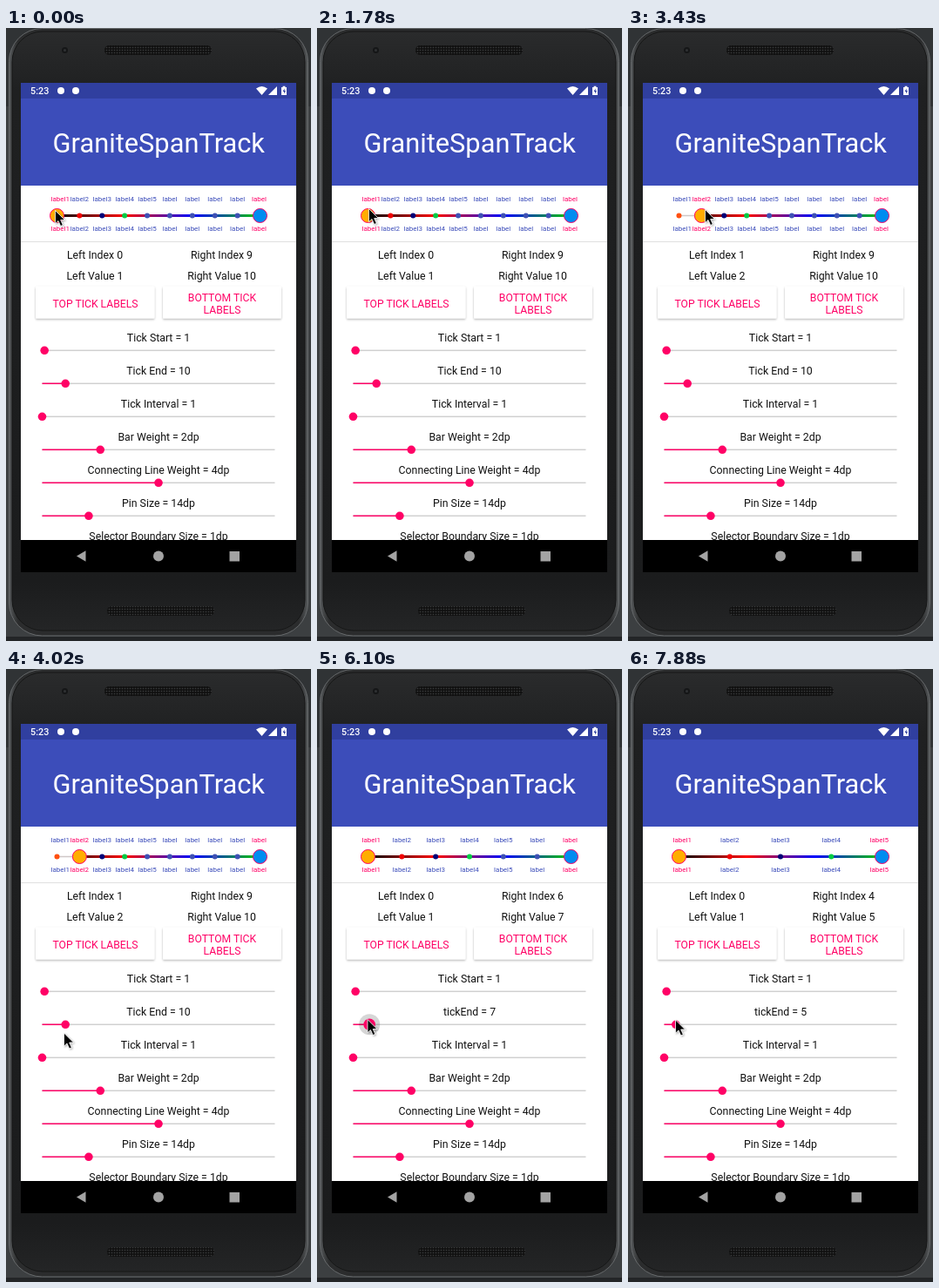
Write an HTML page that moves like this. It is 350x704 px and loops after 8000 ms.

```html
<!DOCTYPE html>
<html lang="en">
<head>
<meta charset="utf-8">
<title>Range slider demo</title>
<style>
html, body { margin: 0; width: 100%; height: 100%; overflow: hidden; background: #3c3f41; }
svg { display: block; width: 350px; height: 704px; font-family: Roboto, "Open Sans", sans-serif; }
text { white-space: pre; }
</style>
</head>
<body>
<svg viewBox="0 0 350 704">
  <defs>
    <linearGradient id="rim" x1="0" x2="1" y1="0" y2="0">
      <stop offset="0" stop-color="#55585a"/><stop offset=".03" stop-color="#2b2c2d"/>
      <stop offset=".97" stop-color="#2b2c2d"/><stop offset="1" stop-color="#55585a"/>
    </linearGradient>
    <linearGradient id="body" x1="0" x2="0" y1="0" y2="1">
      <stop offset="0" stop-color="#2a2b2c"/><stop offset=".1" stop-color="#1f2021"/>
      <stop offset=".92" stop-color="#1b1c1d"/><stop offset="1" stop-color="#242526"/>
    </linearGradient>
    <linearGradient id="line" gradientUnits="userSpaceOnUse" x1="58.5" x2="291.5" y1="0" y2="0">
      <stop offset="0" stop-color="#000"/><stop offset=".333" stop-color="#f00"/>
      <stop offset=".667" stop-color="#00f"/><stop offset="1" stop-color="#0c0"/>
    </linearGradient>
    <pattern id="mesh" width="3" height="3" patternUnits="userSpaceOnUse">
      <rect width="3" height="3" fill="#111"/><circle cx="1.5" cy="1.5" r=".8" fill="#3a3b3c"/>
    </pattern>
    <filter id="lift" x="-10%" y="-20%" width="120%" height="150%">
      <feDropShadow dx="0" dy="1.3" stdDeviation="1" flood-color="#000" flood-opacity=".3"/>
    </filter>
    <filter id="soft" x="-50%" y="-50%" width="220%" height="220%">
      <feDropShadow dx="1" dy="1" stdDeviation=".8" flood-color="#000" flood-opacity=".35"/>
    </filter>
    <clipPath id="page"><rect x="17" y="181" width="316" height="407"/></clipPath>
  </defs>
  <g id="device"></g>
  <g clip-path="url(#page)">
    <g id="fixed"></g>
    <g id="live"></g>
  </g>
  <path id="cursor" d="M0 0V15.2L3.5 12L6.2 18L8.8 16.8L6.2 11H11Z" fill="#000" stroke="#fff" stroke-width=".8" filter="url(#soft)"/>
</svg>
<script>
const PINK = '#ff0266', BLUE = '#3c4dba', INK = '#111';
const LEFT = 58.5, RIGHT = 291.5, BAR_Y = 215.5;
const LOOP = 8000;
const $ = id => document.getElementById(id);

const rect = (x, y, w, h, fill, extra = '') =>
  `<rect x="${x}" y="${y}" width="${w}" height="${h}" fill="${fill}" ${extra}/>`;
const dot = (x, y, r, fill, extra = '') =>
  `<circle cx="${x}" cy="${y}" r="${r}" fill="${fill}" ${extra}/>`;
const shape = (d, fill, extra = '') => `<path d="${d}" fill="${fill}" ${extra}/>`;
const label = (s, x, y, size = 12.3, fill = INK, extra = 'text-anchor="middle"') =>
  `<text x="${x}" y="${y}" font-size="${size}" fill="${fill}" ${extra}>${s}</text>`;

function device() {
  return rect(0, 0, 350, 704, '#3c3f41') + rect(0, 0, 350, 90, '#303335') +
    rect(0, 699, 350, 5, '#232527') +
    rect(3.5, .5, 343, 697.5, 'url(#rim)', 'rx="38" stroke="#65686a"') +
    rect(7, 4, 336, 688, 'url(#body)', 'rx="35" stroke="#161717"') +
    rect(113, 20, 123, 11, 'url(#mesh)', 'rx="5"') +
    rect(116, 664, 123, 11, 'url(#mesh)', 'rx="5"') +
    dot(67.5, 25.5, 3.5, '#151617') + dot(67.5, 25.5, 1.5, '#303234') +
    rect(17, 63, 316, 18, '#303f9f') +
    rect(17, 81, 316, 100, BLUE) +
    rect(17, 181, 316, 407, '#fff') +
    rect(17, 588, 316, 37, '#000') +
    label('5:23', 28, 76, 10.8, '#fff', 'font-weight="500"') +
    dot(63, 72, 4, '#fff') + dot(80, 72, 4, '#fff') +
    shape('M287 69.5Q293.5 64.5 300 69.5L293.5 77Z', '#fff') +
    shape('M301 77L311 67V77Z', '#fff') +
    shape('M316 68h1.6v-1.2h2.8V68h1.6v9h-6Z', '#fff') +
    shape('M319.6 69.5l-2 3.5h1.4v2.5l2-3.5h-1.4Z', '#303f9f') +
    label('GraniteSpanTrack', 175.3, 143, 30.8, '#fff') +
    shape('M81 606.5L91.5 600.3V612.7Z', '#a3a3a3') +
    dot(175, 606.5, 6, '#a3a3a3') + rect(256.5, 601, 11.5, 11.5, '#a3a3a3');
}

function slider(y, value, press = 0) {
  const x = 41.5 + 2.67 * value;
  return rect(41.5, y - .75, 267, 1.5, '#d0d0d0') + rect(41.5, y - .75, x - 41.5, 1.5, PINK) +
    (press > 1 ? dot(x, y, 12, '#000', 'opacity=".16"') : '') +
    dot(x, y, press ? 6.8 : 4.8, PINK);
}

function fixed() {
  const rows = [['Tick Start = 1', 1], , ['Tick Interval = 1', 0], ['Bar Weight = 2dp', 25],
    ['Connecting Line Weight = 4dp', 50], ['Pin Size = 14dp', 20], ['Selector Boundary Size = 1dp', 10]];
  let out = rect(17, 245, 316, 1, '#e0e0e0') +
    rect(34, 296.5, 136.5, 37, '#fff', 'rx="1.5" filter="url(#lift)"') +
    rect(180, 296.5, 136, 37, '#fff', 'rx="1.5" filter="url(#lift)"') +
    label('TOP TICK LABELS', 102.5, 320.5, 12.2, PINK) +
    label('BOTTOM TICK', 248, 314, 12.2, PINK) + label('LABELS', 248, 328, 12.2, PINK);
  rows.forEach(([name, value], i) => {
    out += label(name, 175, 360 + 38 * i) + slider(370.3 + 38 * i, value);
  });
  return out;
}

function rangeBar(s) {
  const tickColors = ['#ff5010', '#f00000', '#000078', '#00cc44'];
  const gap = (RIGHT - LEFT) / (s.end - 1);
  let ticks = '', names = '';
  for (let i = 0; i < s.end; i++) {
    const x = LEFT + gap * i;
    const name = 'label' + (i < 5 ? i + 1 : '');
    const half = i < 5 ? 10.8 : 8.5;
    const tx = Math.min(Math.max(x, 51.5 + half), 299 - half);
    const on = i === s.end - 1 || Math.abs(x - s.thumb) < .2;
    ticks += dot(x, BAR_Y, 3, tickColors[i] || '#3f51b5');
    for (const y of [198.5, 232.8]) names += label(name, tx, y, 8, on ? PINK : BLUE);
  }
  const edge = `stroke="${PINK}" stroke-width="1"`;
  let out = rect(LEFT, BAR_Y - .75, RIGHT - LEFT, 1.5, '#cfc8c8') +
    rect(s.thumb, BAR_Y - 1.5, RIGHT - s.thumb, 3, 'url(#line)') + ticks + names +
    dot(s.thumb, BAR_Y, 8, '#ffad00', edge) + dot(RIGHT, BAR_Y, 8, '#008cf0', edge);
  if (s.pin) {
    out += `<g transform="translate(${s.thumb} 192.5)">` +
      shape('M0 15.5C-3 10.5-10.7 7-10.7 0A10.7 10.7 0 0 1 10.7 0C10.7 7 3 10.5 0 15.5Z', '#713a6c') +
      label(index(s) + 1, 0, 3.6, 12, '#fff') + '</g>';
  }
  return out;
}

const index = s => Math.round((s.thumb - LEFT) / (RIGHT - LEFT) * (s.end - 1));

function live(s) {
  const i = index(s);
  return rangeBar(s) +
    label('Left Index ' + i, 102, 265) + label('Right Index ' + (s.end - 1), 247.5, 265) +
    label('Left Value ' + (i + 1), 102, 289) + label('Right Value ' + s.end, 247.5, 289) +
    label((s.end < 10 ? 'tickEnd = ' : 'Tick End = ') + s.end, 175, 398) +
    slider(408.3, s.end, s.press);
}

// time, pointer x, pointer y, other changes
const steps = [
  [0, 56.5, 209.5, { thumb: LEFT, end: 10, pin: false, press: 0 }],
  [300, 62, 210], [450, 72, 211], [600, 84, 212], [750, 92, 212], [890, 96, 212],
  [1490, 88, 210], [1640, 72, 208.5], [1780, 59.5, 207.5], [1930, 59.5, 207.5, { pin: true }],
  [2230, 64, 207.5, { thumb: 63 }], [2380, 70, 207.5, { thumb: 69 }],
  [2530, 78, 207.5, { thumb: 77.5 }], [2680, 84.5, 207.5, { thumb: 83.5 }],
  [2830, 87, 208, { thumb: 85 }], [2980, 88.5, 208.5, { thumb: 85.5 }],
  [3430, 88.5, 208.5, { thumb: LEFT + (RIGHT - LEFT) / 9, pin: false }],
  [3730, 85, 232], [3880, 73, 335], [4020, 66.5, 418], [4160, 67, 411], [4310, 67, 404],
  [5210, 66, 402.5], [5650, 66, 402.5, { press: 1 }],
  [6100, 58, 402.5, { thumb: LEFT, end: 7, press: 2 }],
  [6840, 56.5, 402.5, { end: 6 }], [6990, 56, 402.5],
  [7430, 54.5, 403, { end: 5 }], [7880, 54.5, 403, { press: 0 }]
];

let state = {};
const timeline = steps.map(([at, x, y, change]) => (state = { ...state, ...change, at, x, y }));

$('device').innerHTML = device();
$('fixed').innerHTML = fixed();

let shown;
function draw(now) {
  const t = now % LOOP;
  const s = timeline.findLast(step => step.at <= t) || timeline[0];
  if (s !== shown) {
    shown = s;
    $('live').innerHTML = live(s);
    $('cursor').setAttribute('transform', `translate(${s.x} ${s.y})`);
  }
}

const start = performance.now();
function tick() {
  draw(performance.now() - start);
  requestAnimationFrame(tick);
}
tick();
</script>
</body>
</html>
```
